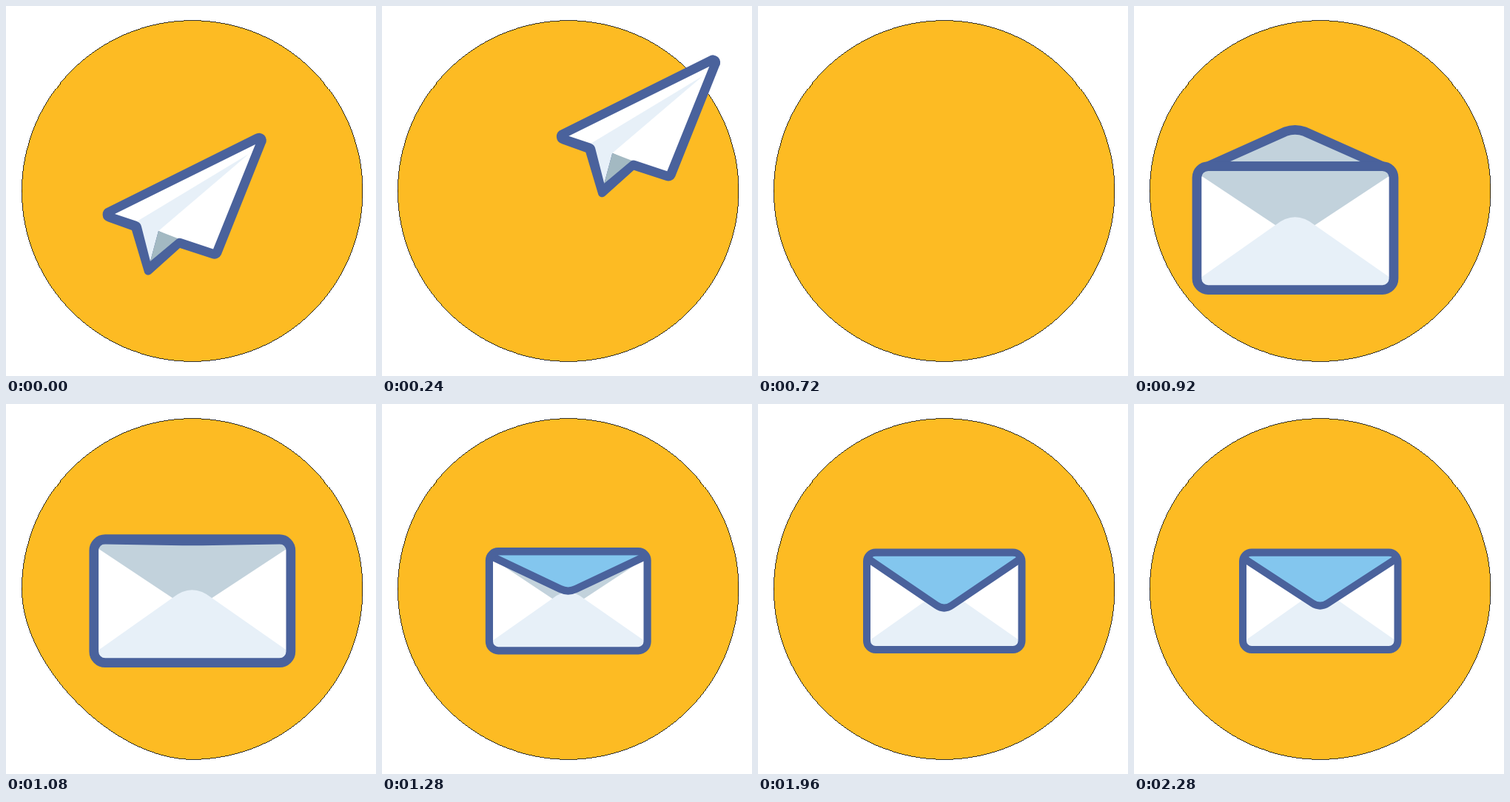
These frames come from a looping animation (500x500 px, 2920 ms). An HTML page:

```html
<!DOCTYPE html>
<html lang="en">
<head>
<meta charset="utf-8">
<title>Sending mail</title>
<style>
html, body { margin: 0; width: 100%; height: 100%; overflow: hidden; background: #fff; }
svg { display: block; width: 100%; height: 100%; }
</style>
</head>
<body>
<svg viewBox="0 0 500 500">
  <clipPath id="view"><rect x="4" width="492" height="500"/></clipPath>
  <clipPath id="body"><rect x="147" y="200.5" width="209.5" height="131.5" rx="12"/></clipPath>
  <path id="disc" fill="#fdbb23" stroke="#000" stroke-width=".8" shape-rendering="crispEdges"/>
  <g id="rays" stroke="#ffe97d" stroke-width="6" stroke-linecap="round"></g>
  <g clip-path="url(#view)">
    <g id="plane">
      <path fill="#4a629c" d="M336.5 173.2A10 10 0 0 1 350.3 187L290.8 336A10 10 0 0 1 278 341L235 327L196 362A5.5 5.5 0 0 1 187 360L170 303L138 291.5A10 10 0 0 1 137 272.5Z"/>
      <path fill="#fff" d="M337 187L280 328.5L238 314.5Q234 313 230 315L206 304L180 292L147 281Z"/>
      <path fill="#e7f0f8" d="M328 200L206 304L195 345L183 298Q182 293 177 291Z"/>
      <path fill="#a3b9c2" d="M206 304L232 314L195 345Z"/>
    </g>
    <g id="mail">
      <path id="lid" fill="#c2d2dc" stroke="#4a629c" stroke-width="10" stroke-linejoin="round"/>
      <g clip-path="url(#body)">
        <path fill="#fff" d="M147 200H357V333H147Z"/>
        <path fill="#c2d2dc" d="M147 200H357V207.5L251.5 277L147 207.5Z"/>
        <path fill="#e7f0f8" d="M147 322L230.6 263Q251.5 246 272.4 263L357 322V333H147Z"/>
        <path id="flap" fill="#83c6ee" stroke="#4a629c" stroke-width="10" stroke-linejoin="round"/>
      </g>
      <rect x="147" y="200.5" width="209.5" height="131.5" rx="12" fill="none" stroke="#4a629c" stroke-width="10"/>
    </g>
  </g>
</svg>
<script>
const LOOP = 2920, STEP = 40, LAST = 2280;
const CX = 251.7, CY = 250, R = 230.3, KAPPA = 0.5523;
const $ = id => document.getElementById(id);
const span = (t, a, b) => Math.min(1, Math.max(0, (t - a) / (b - a)));
const easeOut = p => 1 - (1 - p) ** 3;
const easeInOut = p => p * p * (3 - 2 * p);
const show = (el, on) => el.setAttribute("visibility", on ? "visible" : "hidden");

const rays = Array.from({ length: 7 }, (_, i) => {
  const ray = document.createElementNS("http://www.w3.org/2000/svg", "line");
  ray.setAttribute("transform", `translate(250.7 250) rotate(${i * 360 / 7 + 0.5})`);
  $("rays").append(ray);
  return ray;
});

// Circle whose lower left quarter flattens by dent
function discPath(dent) {
  const k = R * KAPPA, q = R * (KAPPA - dent);
  return `M${CX} ${CY + R}c${-q} 0 ${-R} ${q - R} ${-R} ${-R}` +
    `c0 ${-k} ${R - k} ${-R} ${R} ${-R}c${k} 0 ${R} ${R - k} ${R} ${R}` +
    `c0 ${k} ${k - R} ${R} ${-R} ${R}Z`;
}

// s: -1 open, 0 edge-on, 1 closed; inset moves the hinge ends inwards
function flapPath(s, inset) {
  const y = v => 200.5 + v * s;
  const left = 147 + inset, right = 356.5 - inset, side = inset ? 0 : 7.2;
  return `M${left} ${y(0)}V${y(side)}L241 ${y(69)}Q251.5 ${y(76)} 262 ${y(69)}` +
    `L${right} ${y(side)}V${y(0)}Z`;
}

function flapTurn(t) {
  const u = (t - 1360) / 1000;
  return u < 0 ? Math.max(-1, 1 + u / 0.287)
               : 1 + 0.295 * Math.exp(-3.5 * u) * Math.sin(13.1 * u);
}

function draw(t) {
  const fly = 105.3 * (t / 240) ** 2;
  show($("plane"), t < 560);
  $("plane").setAttribute("transform", `translate(${fly} ${-fly})`);

  $("disc").setAttribute("d", discPath(0.095 * Math.sin(Math.PI * span(t, 920, 1240))));

  const away = 430 * (1 - easeOut(span(t, 760, 1040)));
  const size = 1.27 - 0.27 * easeInOut(span(t, 1080, 1320));
  show($("mail"), t >= 760);
  $("mail").setAttribute("transform",
    `translate(${251.5 - away} ${266.4 + away}) scale(${size}) translate(-251.5 -266.4)`);

  const s = flapTurn(t), open = s < 0;
  $("lid").setAttribute("d", open ? flapPath(s, 12) : "");
  $("flap").setAttribute("d", open ? "" : flapPath(s, 0));

  const p = span(t, 1280, 1680);
  const head = 100 + 104 * easeOut(span(p, 0, 0.5));
  const tail = 100 + 104 * easeOut(span(p, 0.1, 1));
  for (const ray of rays) {
    ray.setAttribute("y1", -head);
    ray.setAttribute("y2", -Math.min(head, tail));
  }
  show($("rays"), p > 0 && p < 1);
}

const start = performance.now();
function tick() {
  const t = (performance.now() - start) % LOOP;
  draw(Math.min(LAST, Math.floor(t / STEP) * STEP));
  requestAnimationFrame(tick);
}
tick();
</script>
</body>
</html>
```
